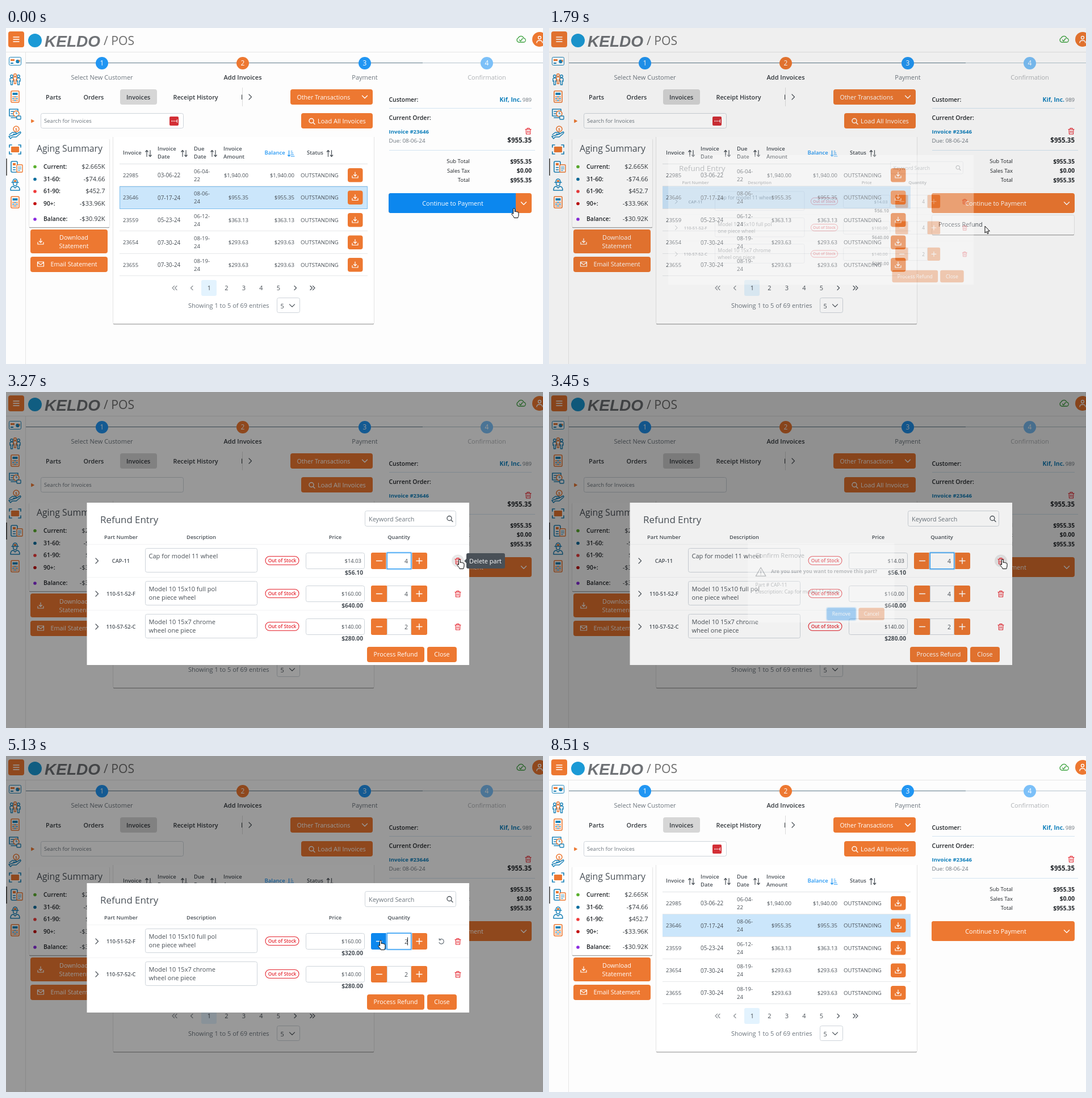
An HTML page for the animation above (8.84 s loop, 946 by 592 pixels).

```html
<!DOCTYPE html>
<html lang="en">
<head>
<meta charset="utf-8">
<title>Refund entry</title>
<style>
html, body { margin: 0; height: 100%; overflow: hidden; background: #fdfdfd; }
svg { display: block; width: 100vw; height: 100vh; font-family: "Open Sans", "Noto Sans", sans-serif; }
text { white-space: pre; }
</style>
</head>
<body>
<svg viewBox="0 0 946 592"><g id="page"></g><g id="live"></g></svg>
<script>
const LOOP = 8840;
const ORANGE = '#ed7831', BLUE = '#0c87ee', SKY = '#2196f3', LINK = '#0b7dba', INK = '#495057',
  DARK = '#212529', GRAY = '#6c757d', RED = '#e5252f', ICON = '#1c83b8';

// Drawing helpers; text is placed by the middle of its capitals.
const T = (x, y, s, size = 11, fill = INK, weight = 400, anchor = 'start') =>
  `<text x="${x}" y="${y + size * .36}" font-size="${size}" fill="${fill}" font-weight="${weight}" text-anchor="${anchor}">${s}</text>`;
const mid = (x, y, s, size, fill, weight) => T(x, y, s, size, fill, weight, 'middle');
const end = (x, y, s, size, fill, weight) => T(x, y, s, size, fill, weight, 'end');
const R = (x, y, w, h, fill, r = 0, extra = '') =>
  `<rect x="${x}" y="${y}" width="${w}" height="${h}" rx="${r}" fill="${fill}" ${extra}/>`;
const box = (x, y, w, h, stroke = '#ced4da', r = 3, fill = '#fff') =>
  R(x + .5, y + .5, w - 1, h - 1, fill, r, `stroke="${stroke}"`);
const C = (x, y, r, fill, extra = '') => `<circle cx="${x}" cy="${y}" r="${r}" fill="${fill}" ${extra}/>`;
const L = (x, y, d, stroke = INK, w = 1.2, fill = 'none') =>
  `<path transform="translate(${x} ${y})" d="${d}" stroke="${stroke}" stroke-width="${w}" fill="${fill}" stroke-linecap="round" stroke-linejoin="round"/>`;

const DOWN = 'M-4.5-2.2L0 2.3 4.5-2.2', RIGHT = 'M-2-4.5L2.5 0-2 4.5';
const SAVE = 'M-5 1.5V5H5V1.5M0-5V2M-2.5-.5L0 2 2.5-.5';
const SORT = 'M-3 5.5v-11m-2.2 2.5l2.2-2.5 2.2 2.5M3-5.5v11m-2.2-2.5l2.2 2.5 2.2-2.5';
const LENS = 'M3-1A4 4 0 1 1-5-1 4 4 0 1 1 3-1M2 2L5 5';
const trash = (x, y) => L(x, y, 'M-5-3H5M-2-3v-2h4v2M-4-3l.5 8.5h7L4-3M-1.3-.5v3.5M1.3-.5v3.5', RED, 1.1);
const button = (x, y, w, h, s, fill = ORANGE) => R(x, y, w, h, fill, 4) + mid(x + w / 2, y + h / 2, s, 10.8, '#fff');
const card = (x, y, w, h) => box(x, y, w, h, '#e4e4e4') + R(x + 1, y + h - 1, w - 2, 1, '#a3a3a3') + R(x + 2, y + h, w - 4, 1, '#e4e4e4');

function calculator(y) {
  let s = R(9, y - 10, 14, 20, '#fff', 1.5, `stroke="${ORANGE}" stroke-width="1.6"`) + R(11.5, y - 7, 9, 4, ICON);
  for (let i = 0; i < 9; i++) s += R(11.3 + i % 3 * 3.4, y - .8 + (i / 3 | 0) * 3.2, 2.4, 2, i % 2 ? ICON : ORANGE);
  return s;
}

function person(x, y, color) {
  return C(x, y - 6, 2.3, 'none', `stroke="${color}" stroke-width="1.4"`) + L(x, y, 'M-3 3v-5q3-2 6 0v5M-1.5 2v7h3v-7', color, 1.4);
}

function sidebar() {
  return R(34, 42, 1, 550, '#e6e6e6') + R(0, 230, 2, 30, '#6b6b6b') +
    box(5, 51, 22, 15, ICON, 2) + R(8, 55, 7, 3, ORANGE) + R(8, 61, 5, 2, ICON) + C(20.5, 59, 3.2, ICON) + L(22, 57, 'M0 0h2v2', ORANGE, 1.5) +
    person(10, 91, ICON) + person(22, 91, ICON) + person(16, 89, ORANGE) +
    calculator(121) +
    L(16, 152, 'M-10-9H5V3H-10zM-7-5h5M-7-1h3M-7 6H3', ICON, 1.6) + C(18, 151, 5, '#fff', `stroke="${ORANGE}" stroke-width="1.5"`) +
    L(18, 151, 'M0-3V0H2', ICON) + R(19, 155, 7, 6, '#fff', 1, `stroke="${ICON}" stroke-width="1.4"`) +
    C(18, 178, 5, '#fff', `stroke="${ORANGE}" stroke-width="1.5"`) + mid(18, 178, '$', 7, ORANGE, 700) +
    L(16, 186, 'M-10 2l5-4h6q2 1 0 3h-4M2 1l7-4q2 1 0 3L2 6h-7l-3 3-3-4z', ICON, 1.5) +
    L(16, 214, 'M-10-4v-4h4M6-8h4v4M10 4v4h-4M-6 8h-4v-4', ICON, 1.7) + R(9, 209, 14, 10, ORANGE, 1) +
    R(9, 235, 11, 19, '#fff', 2, `stroke="${ICON}" stroke-width="1.6"`) + R(12, 238, 5, 4, ORANGE) + R(12, 245, 5, 1.5, ICON) + R(12, 249, 5, 1.5, ICON) +
    R(19, 241, 10, 13, '#fff', 1, `stroke="${ORANGE}" stroke-width="1.4"`) + L(24, 247, 'M-2.5-2h5M-2.5 1h5M-2.5 4h3', ICON) +
    L(16, 276, 'M-6-4h12M-4-4q0-6 4-6t4 6M-3.5-4q0 6 3.5 6t3.5-6M-8 10q0-7 5-7l3 3 3-3q5 0 5 7z', ICON, 1.5) + R(14, 268, 4, 3, ORANGE) +
    calculator(307);
}

function topBar() {
  const steps = [[169, 'Select New Customer', SKY], [417, 'Add Invoices', ORANGE], [632, 'Payment', SKY], [847, 'Confirmation', '#7cc0f8']];
  return R(0, 42, 946, 1, '#e6e6e6') + R(4, 6, 28, 28, ORANGE, 4) + L(18, 20, 'M-5-4H5M-5 0H5M-5 4H5', '#fff', 1.5) +
    C(51, 22, 12, '#1b9ad6') +
    `<text x="68" y="33" font-family="Liberation Sans, Arial, sans-serif" font-size="28" font-weight="700" font-style="italic" fill="#6f7276">KELDO</text>` +
    T(172, 22.5, '/ POS', 21.2, '#6d6d6d') +
    L(907, 20, 'M-4 5h8.5a3.5 3.5 0 0 0 .5-7A5 5 0 0 0-4.5-2.5 4 4 0 0 0-4 5M-2.5 1L-.5 3 3-1.5', '#3da23f', 1.3) +
    C(940, 20, 13, ORANGE) + L(940, 20, 'M2.5-3A2.5 2.5 0 1 1-2.5-3 2.5 2.5 0 1 1 2.5-3M-5 6q0-4 5-4t5 4', '#fff', 1.4) +
    R(35, 61, 699, 1, '#5f7a8a') + R(734, 61, 212, 1, '#b4c4cd') +
    steps.map(([x, s, fill], i) => C(x, 62, 11, fill) + mid(x, 62, i + 1, 12, '#fff') +
      mid(x, 87.5, s, 11, i == 1 ? '#33383d' : i == 3 ? '#b0b3b6' : GRAY, i == 1 ? 600 : 400)).join('');
}

function leftPanel() {
  const aging = [['Current:', '$2.665K', '#5bb02f'], ['31-60:', '-$74.66', '#0a6e9e'], ['61-90:', '$452.7', '#f03a3a'],
    ['90+:', '-$33.96K', '#c20f0f'], ['Balance:', '-$30.92K', '#8b2be0']];
  return R(201, 108, 65, 27, '#d6d6d6', 4) +
    [[70, 'Parts'], [136.5, 'Orders'], [212, 'Invoices'], [294.5, 'Receipt History']].map(([x, s]) => T(x, 122, s, 10.8, '#33383d', 600)).join('') +
    R(415, 117.5, 1.3, 8.5, '#33383d') + R(416, 105, 1, 33, '#dcdcdc') + L(430, 121.5, RIGHT) +
    R(501, 108, 145, 27, ORANGE, 4) + T(512.5, 122, 'Other Transactions', 10.6, '#fff') + L(632, 121.5, DOWN, '#fff', 1.4) +
    R(520, 150, 126, 27, ORANGE, 4) + L(539, 164.5, LENS, '#fff', 1.4) + T(549, 164, 'Load All Invoices', 11, '#fff') +
    L(45, 164, 'M0-2.5L4.5 0 0 2.5z', ORANGE, 1, ORANGE) + box(61, 150, 252, 27) + T(67, 164, 'Search for Invoices', 9.55, GRAY) +
    card(40, 194, 143, 158) + R(40, 190, 143, 6, '#fdfdfd') + mid(112, 212, 'Aging Summary', 15.8, INK, 500) +
    aging.map(([k, v, c], i) => { const y = [244, 266, 287.5, 309, 336.5][i];
      return C(51, y + .5, 2.8, c) + T(66, y, k, 10.4, DARK, 600) + end(174.5, y, v, 11, '#33383d'); }).join('') +
    R(43, 355, 136, 42, ORANGE, 4) + L(61, 376, SAVE, '#fff') + mid(119.5, 369.5, 'Download', 10.75, '#fff') + mid(119.5, 384.5, 'Statement', 10.75, '#fff') +
    R(43, 403, 136, 27, ORANGE, 4) + L(61, 416, 'M-5.5-4h11v8h-11zM-5.5-3L0 1 5.5-3', '#fff') + T(78.5, 416.5, 'Email Statement', 10.75, '#fff');
}

function invoiceTable() {
  const rows = [['22985', '03-06-22', '06-04-22', '$1,940.00'], ['23646', '07-17-24', '08-06-24', '$955.35'], ['23559', '05-23-24', '06-12-24', '$363.13'],
    ['23654', '07-30-24', '08-19-24', '$293.63'], ['23655', '07-30-24', '08-19-24', '$293.63']];
  const head = (x, y, s, fill = INK) => T(x, y, s, 9.5, fill, 600);
  return card(188, 188, 461, 334) + R(188, 186, 461, 6, '#fdfdfd') +
    head(206, 220, 'Invoice') + head(267, 213, 'Invoice') + head(267, 226.5, 'Date') + head(331, 213, 'Due') + head(331, 226.5, 'Date') +
    head(383, 213, 'Invoice') + head(383, 226.5, 'Amount') + head(455.5, 220, 'Balance', SKY) + head(530, 220, 'Status') +
    [251, 314, 366, 570.5].map(x => L(x, 221, SORT)).join('') + L(502, 221, 'M-3.5-5v10m-2-2l2 2 2-2M0-4h2M0-1h3.5M0 2h4.5M0 5h6', SKY) +
    R(200, 239, 437, 1, '#dfe2e5') +
    rows.map(([no, date, due, sum], i) => { const y = 259.5 + i * 39.5;
      return (i == 1 ? R(200, 279, 437, 39, '#cbe6fb') : '') + R(200, Math.floor(y + 19), 437, 1, '#e6e8ea') +
        T(206, y, no, 9.5) + T(267, y, date, 9.9) + T(331, y - 7, due.slice(0, 6), 9.6) + T(331, y + 7, due.slice(6), 9.6) +
        end(427, y, sum, 9.55) + end(508, y, sum, 9.55) + T(519, y, 'OUTSTANDING', 9.6) +
        R(602, y - 12.5, 26.5, 24.5, ORANGE, 4) + L(615, y - .5, SAVE, '#fff'); }).join('') +
    R(344, 444, 27, 28, '#e3f3fe', 3) + [1, 2, 3, 4, 5].map((n, i) => mid(358 + i * 30.5, 458.5, n, 11)).join('') +
    L(297, 458, 'M-.5-3.5L-4 0-.5 3.5M4-3.5L.5 0 4 3.5', '#8b9095') + L(327, 458, 'M2-3.5L-1.5 0 2 3.5', '#8b9095') +
    L(510, 458, 'M-2-3.5L1.5 0-2 3.5') + L(540, 458, 'M.5-3.5L4 0 .5 3.5M-4-3.5L-.5 0-4 3.5') +
    T(321, 489, 'Showing 1 to 5 of 69 entries', 11.05, GRAY) + box(477, 475, 41, 27) + T(483.5, 490, '5', 11) + L(504, 489, DOWN);
}

function orderPanel() {
  return T(674.5, 126.5, 'Customer:', 10.4, DARK, 600) + end(908, 126.5, 'Kif, Inc.', 10.4, LINK, 700) + end(926, 126.5, '989', 9.5, GRAY) +
    R(675, 141, 251, 1, '#d3e4f1') + T(674.5, 158.5, 'Current Order:', 10.5, DARK, 600) +
    T(674.5, 183, 'Invoice #23646', 9.6, LINK, 700) + trash(920, 181.5) + T(674.5, 198, 'Due: 08-06-24', 9.85, GRAY) +
    end(926, 198, '$955.35', 11.5, DARK, 700) + R(675, 215, 257, 1, '#d3e4f1') +
    [['Sub Total', '$955.35'], ['Sales Tax', '$0.00'], ['Total', '$955.35']].map(([k, v], i) =>
      end(817, 235 + i * 16.5, k, 9.5, DARK) + end(926, 235 + i * 16.5, v, 10.2, DARK, 700)).join('');
}

// Value of the last entry whose time has been reached.
const hold = (t, keys) => keys.reduce((v, [at, value]) => t >= at ? value : v, 0);
const between = (t, a, b) => t >= a && t < b;
const popup = (p, body) => p ? R(0, 0, 946, 592, '#000', 0, `opacity="${.4 * p ** 1.8}"`) +
  `<g opacity="${p}" transform="translate(479 338) scale(${.7 + .3 * p}) translate(-479 -338)">${body}</g>` : '';

function refundRow(y, [part, lines, price, total, qty], o) {
  const field = box(671, y - 14.5, 43, 29, o.focus ? SKY : o.soft ? '#a9d5f7' : '#ced4da', 0);
  return L(160, y, RIGHT) + mid(202.5, y + .5, part, 9.3, INK, 600) + box(245, y - 22.5, 198, 43) +
    lines.map((s, i) => T(251.5, y - 8 + i * 15, s, 11)).join('') +
    R(457, y - 8, 59, 15, '#fff', 7.5, `stroke="${RED}" stroke-width="1.1"`) + mid(486.5, y - .5, 'Out of Stock', 8.4, RED, 600) +
    box(528, y - 14.5, 104, 29) + end(626, y + .5, price, 9.45) + end(629, y + 21, total, 10.2, INK, 700) +
    R(643, y - 14.5, 29, 29, o.minus ? BLUE : ORANGE, 3) + R(713, y - 14.5, 29, 29, ORANGE, 3) +
    (o.focus ? R(671, y - 14.5, 43, 29, '#fff', 1, 'stroke="#a6d5fa" stroke-width="3"') : '') + field +
    L(657.5, y, 'M-5 0H5', '#fff', 1.4) + L(728, y, 'M-5 0H5M0-5V5', '#fff', 1.4) + end(708, y + .5, qty, 10.5) +
    (o.caret ? R(707, y - 7, 1, 14, DARK) : '') +
    (o.undo ? L(767, y, 'M-3.3-2.6A4.3 4.3 0 1 1-4 2M-3.8-5v2.7h2.7', GRAY, 1.2) : '') +
    (o.hover ? C(796, y, 11, '#e8e8e8') : '') + trash(796, y);
}

function refundModal(t) {
  const qty = hold(t, [[0, 4], [4850, 3], [5040, 2]]);
  const rows = [
    [['CAP-11', ['Cap for model 11 wheel'], '$14.03', '$56.10', 4], { focus: between(t, 1880, 4130), hover: between(t, 3050, 3540) }],
    [['110-51-52-F', ['Model 10 15x10 full pol', 'one piece wheel'], '$160.00', `$${qty * 160}.00`, qty],
      { focus: between(t, 4850, 7040), soft: t >= 7040, minus: between(t, 4760, 5600), undo: t >= 4850,
        caret: between(t, 5040, 7040) && Math.floor((t - 5040) / 535) % 2 == 0 }],
    [['110-57-52-C', ['Model 10 15x7 chrome', 'wheel one piece'], '$140.00', '$280.00', 2], {}]
  ].slice(t >= 4130 ? 1 : 0);
  const h = Math.floor(112 + rows.length * 58.3), top = Math.round(338.2 - h / 2), bottom = top + h;
  return R(142.5, top, 673.5, h, '#fff') + T(166, top + 29.5, 'Refund Entry', 16.9, INK, 500) +
    box(632, top + 14, 161, 28) + T(639, top + 29, 'Keyword Search', 10.8, GRAY) + L(782, top + 28.5, LENS, INK, 1.3) +
    [[202.5, 'Part Number'], [344, 'Description'], [580, 'Price'], [692, 'Quantity']].map(([x, s]) => mid(x, top + 61, s, 9.4, INK, 600)).join('') +
    rows.map(([data, o], i) => R(143, top + 73 + i * 58, 673, 1, '#f2f3f4') + refundRow(top + 102.5 + i * 58, data, o)).join('') +
    (t >= 7040 ? R(635, bottom - 33, 103, 29, '#a6d5fa', 5) : '') +
    button(636, bottom - 32, 101, 27, 'Process Refund', t >= 6120 ? BLUE : ORANGE) + button(742, bottom - 32, 52, 27, 'Close');
}

function confirmBox() {
  return R(318, 248, 323, 175, '#fff', 2) + T(334.5, 276, 'Confirm Remove', 13.9, INK, 500) +
    L(346.5, 312, 'M0-10L11 9H-11zM0-3.5V3M0 5.8v.2', INK, 1.6) +
    T(369, 310, 'Are you sure you want to remove this part?', 10.9, INK, 700) +
    T(334.5, 340.5, 'Part # CAP-11', 10.95) + T(334.5, 355.5, 'Description: Cap for model 11 wheel', 10.95) +
    R(490, 389, 68, 31, '#a6d5fa', 5) + button(492, 391, 64, 27, 'Remove', BLUE) + button(562, 391, 57, 27, 'Cancel');
}

function pageState(t) {
  const main = t < 170 ? BLUE : ORANGE, arrow = between(t, 170, 900) ? BLUE : ORANGE;
  return (t < 620 ? box(200, 279, 437, 40, '#7fbfee', 0, 'none') : '') +
    (t < 2250 || t >= 8510 ? R(288, 156, 16, 16, '#d32f36', 2) + [292.5, 296, 299.5].map(x => C(x, 164, 1, '#fff')).join('') + R(301, 161, 1, 6, '#fff') : '') +
    R(674, 291, 252, 35, arrow, 4) + R(674, 291, 224, 35, main, 4) + R(890, 291, 8, 35, main) +
    mid(787, 309.5, 'Continue to Payment', 10.95, '#fff') + L(912, 309, DOWN, '#fff', 1.4) +
    (between(t, 620, 1880) ? card(674, 329, 252, 36) + T(686, 346, 'Process Refund', 10.8, INK) : '');
}

const track = [[80, 895, 318], [260, 913, 315], [440, 914.5, 314], [760, 914, 314], [1430, 768, 350], [2250, 768, 349], [3060, 799, 295],
  [3600, 799, 295], [3960, 533, 404], [4310, 533, 404], [4800, 660, 325], [5480, 660, 325], [6210, 692, 432], [7420, 692, 432], [7780, 872, 594]];

function cursor(t) {
  if (t >= 7780) return '';
  const i = Math.max(1, track.findIndex(k => k[0] > t)), [t0, x0, y0] = track[i - 1], [t1, x1, y1] = track[i];
  const u = Math.min(1, Math.max(0, (t - t0) / (t1 - t0))), e = u * u * (3 - 2 * u);
  const arrow = between(t, 1790, 3000) || between(t, 3660, 3900) || between(t, 4220, 4740) || between(t, 5600, 6110) || t >= 7460;
  const shape = arrow ? 'M0 0V11.5L2.7 9 4.5 13 6.3 12.2 4.6 8.3H8z'
    : 'M-1.5 9V1.2a1.4 1.4 0 0 1 2.8 0V6c.3-1.2 2.5-1.2 2.7.2.5-1 2.4-.8 2.5.6.6-.8 1.5-.4 1.5.9V12c0 2-1.2 2.6-1.2 4.5H.2C0 14.6-2.5 12.5-4 10.3c-.8-1.3.7-2.4 1.6-1.5z';
  return L(x0 + (x1 - x0) * e, y0 + (y1 - y0) * e, shape, '#000', 1, '#fff');
}

const page = document.getElementById('page'), live = document.getElementById('live');
page.innerHTML = R(0, 0, 946, 592, '#fdfdfd') + sidebar() + topBar() + leftPanel() + invoiceTable() + orderPanel();

let last;
function tick(now) {
  const t = now % LOOP;
  const modal = hold(t, [[1790, .33], [1880, .8], [1970, 1], [7330, .99], [7420, .5], [7510, 0]]);
  const confirm = hold(t, [[3450, .33], [3540, .8], [3630, 1], [4220, .5], [4310, 0]]);
  const tip = between(t, 3090, 3450) ? R(811, 284, 68, 27, INK, 3) + L(808, 297.5, 'M0 0L3-3V3z', INK, 1, INK) + T(816, 298, 'Delete part', 10.95, '#fff') : '';
  const html = pageState(t) + popup(modal, refundModal(t)) + tip + popup(confirm, confirmBox()) + cursor(t);
  if (html !== last) live.innerHTML = last = html;
  requestAnimationFrame(tick);
}
tick(0);
</script>
</body>
</html>
```
